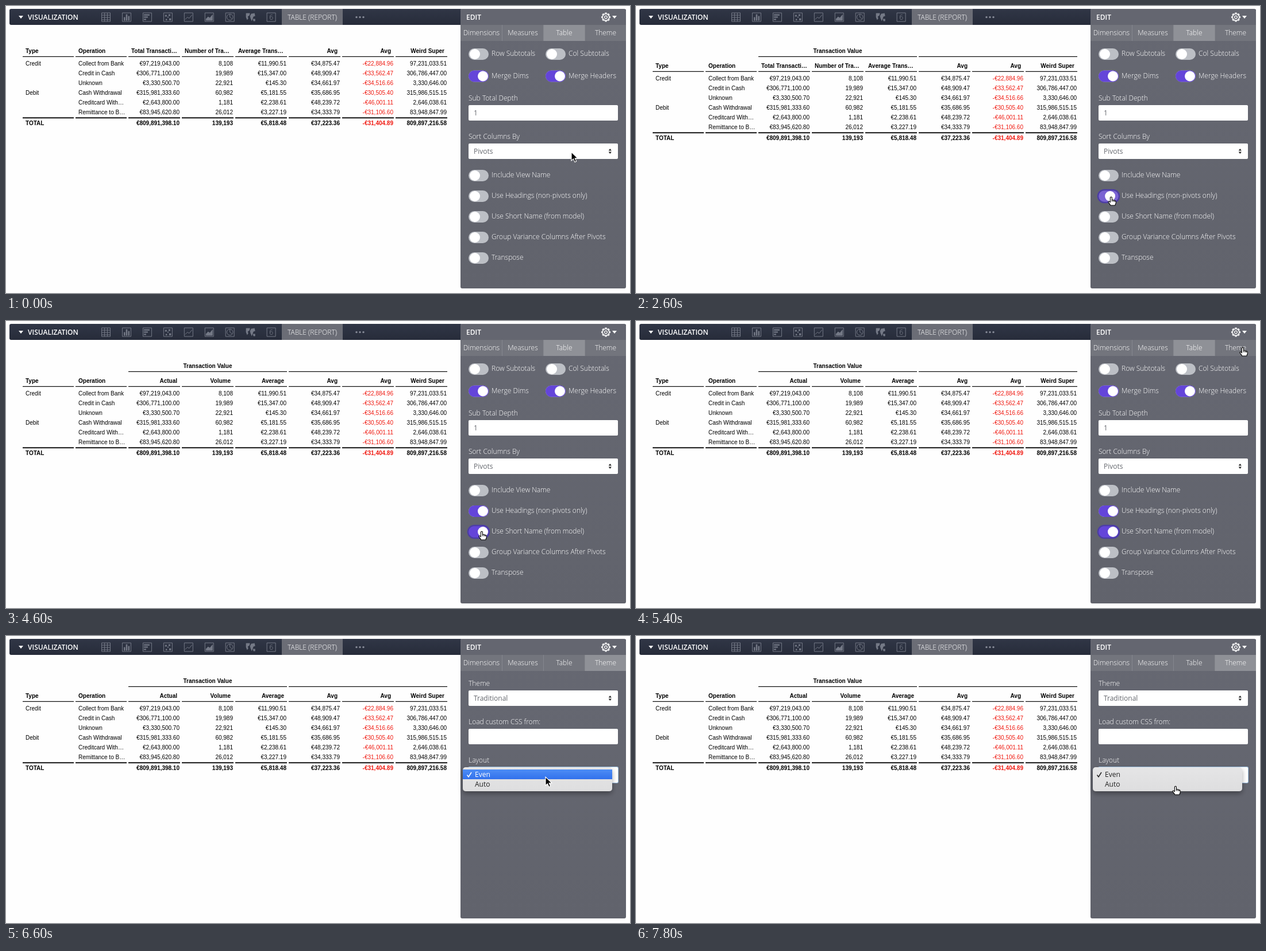
An HTML page for the animation above (8000 ms loop, 1086 by 501 pixels).

```html
<!DOCTYPE html>
<html lang="en">
<head>
<meta charset="utf-8">
<title>Table report settings</title>
<style>
  html, body { margin: 0; width: 100%; height: 100%; overflow: hidden; background: #fefefe; }
  svg { display: block; width: 1086px; height: 501px; }
  text { white-space: pre; }
  .ui { font: 300 12px "Open Sans", sans-serif; fill: #fff; }
  .strong { font-weight: 600; }
  .field { font-weight: 400; fill: #64676d; }
  .menu { font-weight: 400; fill: #222; }
  .data { font: 10px "Liberation Sans", Arial, sans-serif; fill: #000; }
  .bold { font-weight: 700; }
  .neg { fill: #f0180f; }
  .end { text-anchor: end; }
  .mid { text-anchor: middle; }
  .rule { stroke: #111; stroke-width: 1.4; }
  .icon { fill: none; stroke: #747986; stroke-width: 1; }
  .icon .solid { fill: #747986; stroke: none; }
  .ring { fill: none; stroke: #4c3da6; stroke-width: 2.5; }
</style>
</head>
<body>
<svg id="stage" viewBox="0 0 1086 501" xmlns="http://www.w3.org/2000/svg"></svg>
<script>
const LOOP = 8000, STEP = 200;

const text = (x, y, s, cls = "ui") => `<text x="${x}" y="${y}" class="${cls}">${s}</text>`;
const rect = (x, y, w, h, fill, r = 0) =>
  `<rect x="${x}" y="${y}" width="${w}" height="${h}" rx="${r}" fill="${fill}"/>`;
const group = (id, body, attrs = "") => `<g id="${id}" ${attrs}>${body}</g>`;
const path = (d, attrs = "") => `<path d="${d}" ${attrs}/>`;

// Toolbar
const frame = "M-7.5 -7.5h15v15h-15z";
const solid = 'class="solid"';
const iconBodies = [
  path(frame + "M-7.5 -3.5h15M-7.5 .5h15M-7.5 4.5h15M-2.5 -7.5v15M2.5 -7.5v15"),
  path(frame) + path("M-5 0h2.5v6h-2.5zM-1.3 -5h2.6v11h-2.6zM2.6 -2h2.5v8h-2.5z", solid),
  path(frame) + path("M-6 -5h10v2.2h-10zM-6 -1.2h7v2.2h-7zM-6 2.8h4v2.2h-4z", solid),
  path(frame) + path("M-5 -4h3v3h-3zM1 -5h3v3h-3zM-4 3h2.5v2.5h-2.5zM2 2h3.5v3.5h-3.5zM-1 -1h2v2h-2z", solid),
  path(frame + "M-6 4L-2 0L1 2L6 -4"),
  path(frame) + path("M-6 6V3L-2 -1L1 1L6 -5V6z", solid),
  path(frame + "M0 -5V0L4 3") + '<circle r="5.3"/>',
  path("M-8 -7h7l-1 4l-3 2l1 3l-2 3l-2 -5zM1 -6l6 -1l1 5l-3 1l-1 3l-2 5l-2 -5l-1 -4zM4 3h4v4h-3z", solid),
  path(frame)
];

function toolbar() {
  const icons = iconBodies
    .map((body, i) => `<g class="icon" transform="translate(${174 + i * 35.95} 19.5)">${body}</g>`).join("");
  const dots = [610, 616, 622].map(x => `<circle cx="${x}" cy="19.5" r="1.7" fill="#858996"/>`).join("");
  return rect(6, 5, 788, 28, "url(#bar)", 3) + path("M22 17h8l-4 5z", 'fill="#fff"') +
    text(38, 24, "VISUALIZATION", "ui strong") + icons +
    `<text x="461.6" y="24" class="ui mid" style="fill:#8a8e99">6</text>` +
    rect(480, 5, 106, 28, "#6b6d76") + text(533, 24, "TABLE (REPORT)", "ui mid") + dots;
}

// Data table
const colRight = i => 302 + i * 93;
const colStart = i => i < 2 ? 29 + i * 92 : 213 + (i - 2) * 93;
const colWidth = i => i < 2 ? 89 : 90;
const rows = [
  "Credit|Collect from Bank|€97,219,043.00|8,108|€11,990.51|€34,875.47|-€22,884.96|97,231,033.51",
  "|Credit in Cash|€306,771,100.00|19,989|€15,347.00|€48,909.47|-€33,562.47|306,786,447.00",
  "|Unknown|€3,330,500.70|22,921|€145.30|€34,661.97|-€34,516.66|3,330,646.00",
  "Debit|Cash Withdrawal|€315,981,333.60|60,982|€5,181.55|€35,686.95|-€30,505.40|315,986,515.15",
  "|Creditcard With…|€2,643,800.00|1,181|€2,238.61|€48,239.72|-€46,001.11|2,646,038.61",
  "|Remittance to B…|€83,945,620.80|26,012|€3,227.19|€34,333.79|-€31,106.60|83,948,847.99",
  "TOTAL||€809,891,398.10|139,193|€5,818.48|€37,223.36|-€31,404.89|809,897,216.58"
];
const line = (x, y, w, extra = "") => path(`M${x} ${y}h${w}`, `class="rule" ${extra}`);
const columnRules = (y, extra) =>
  Array.from({ length: 8 }, (_, i) => line(colStart(i), y, colWidth(i), extra)).join("");

function tableRow(row, r) {
  const total = r === 6, y = total ? 207.5 : 103.5 + r * 17, weight = total ? " bold" : "";
  return row.split("|").map((s, i) => i < 2
    ? text(34 + i * 92, y, s, "data" + weight)
    : text(colRight(i - 2), y, s, "data end" + weight + (s[0] === "-" ? " neg" : ""))).join("");
}

function table() {
  const head = (i, s) => text(colRight(i) - 4, 81.5, s, "data bold end");
  const long = ["Total Transacti…", "Number of Tra…", "Average Trans…"]
    .map((s, i) => text(218 + i * 93, 81.5, s, "data bold")).join("");
  const short = ["Actual", "Volume", "Average"].map((s, i) => head(i, s)).join("");
  const body = text(34, 81.5, "Type", "data bold") + text(126, 81.5, "Operation", "data bold") +
    group("longNames", long) + group("shortNames", short) +
    head(3, "Avg") + head(4, "Avg") + head(5, "Weird Super") +
    columnRules(88.4) + rows.map(tableRow).join("") +
    columnRules(195.2, 'style="stroke-width:2"');
  const banner = text(351, 81.5, "Transaction Value", "data bold mid") +
    line(213, 88.4, 276) + line(492, 88.4, 276);
  return group("banner", banner) + group("table", body);
}

// Settings panel
function toggle(id, x, y, label, on) {
  const body = rect(0, -10, 35, 20, "#bcbfc5", 10) +
    `<rect class="on" y="-10" width="35" height="20" rx="10" fill="#6445d9"/>` +
    `<rect class="ring" x="-1" y="-11" width="37" height="22" rx="11"/>` +
    `<circle class="knob" cx="11" r="9" fill="#fff"/>`;
  return group(id, body, `transform="translate(${x} ${y + (on ? .5 : 1)})"`) + text(x + 40, y + 4, label);
}
const input = (y, value, select) => rect(805, y, 260, 27, "#fff", 2) +
  text(814, y + 18, value, "ui field") +
  (select ? path(`M1048.7 ${y + 12.6}h5.2l-2.6 -3.6zM1048.7 ${y + 14.4}h5.2l-2.6 3.6z`, 'fill="#222"') : "");

function panel() {
  const tabs = ["Dimensions", "Measures", "Table", "Theme"];
  const gear = Array.from({ length: 8 }, (_, i) =>
    path("M-1.5 -5.6L-1.1 -7.4H1.1L1.5 -5.6", `transform="rotate(${i * 45})"`)).join("");
  return rect(791, 5, 288, 488, "url(#panel)", 3) + rect(791, 6, 288, 27, "#646670") +
    text(801, 24, "EDIT", "ui strong") +
    `<g transform="translate(1044 19.5)" fill="none" stroke="#fff" stroke-width="1.2"><circle r="5.7"/><circle r="2.4"/>${gear}</g>` +
    path("M1055 17h8l-4 5z", 'fill="#fff"') +
    rect(791, 33, 288, 28, "#73757d") + `<rect id="activeTab" y="33" width="72" height="28" fill="#8f9197"/>` +
    [863, 935, 1007].map(x => rect(x, 33, 1, 28, "#85878e")).join("") +
    tabs.map((s, i) => text(827.5 + i * 72, 51, s, "ui mid")).join("") +
    group("tableTab",
      toggle("rowSub", 805, 83, "Row Subtotals") + toggle("colSub", 939, 83, "Col Subtotals") +
      toggle("mergeDims", 805, 122, "Merge Dims", true) + toggle("mergeHeads", 939, 122, "Merge Headers", true) +
      text(805, 165, "Sub Total Depth") + input(173, "1") +
      text(805, 232, "Sort Columns By") + input(240, "Pivots", true) +
      toggle("viewName", 805, 295, "Include View Name") +
      toggle("headings", 805, 331, "Use Headings (non-pivots only)") +
      toggle("shortName", 805, 367, "Use Short Name (from model)") +
      toggle("variance", 805, 403, "Group Variance Columns After Pivots") +
      toggle("transpose", 805, 439, "Transpose")) +
    group("themeTab",
      text(805, 87, "Theme") + input(95, "Traditional", true) +
      text(805, 154, "Load custom CSS from:") + input(162, "") +
      text(805, 221, "Layout") +
      `<rect id="layoutFocus" x="804" y="228" width="262" height="29" rx="3" fill="#9fc3e6"/>` +
      input(229, "Even", true));
}

function popup() {
  return group("popup",
    `<rect x="795" y="229" width="260" height="42" rx="5" fill="url(#menu)" filter="url(#shadow)"/>` +
    `<rect id="pick" x="795" width="260" height="17" fill="url(#blue)"/>` +
    path("M802.5 242.5l2.5 3.5l5 -8", 'id="check" fill="none" stroke-width="1.5"') +
    `<text id="even" x="816" y="246" class="ui menu">Even</text>` +
    `<text id="auto" x="816" y="263" class="ui menu">Auto</text>`);
}

function pointer() {
  const arrow = path("M0 0V15L3.5 11.8L6 17.4L8.6 16.2L6.2 10.8H11z", 'fill="#000" stroke="#fff" stroke-width="1.1"');
  const hand = path("M-1.6 1.4Q0 -.8 1.4 1.4V6Q2.6 4.7 4 6.3Q5.6 5.3 6.3 7Q8.2 6.4 8.2 8.5V11Q7.5 13 6.8 15H-1.2Q-2.6 12 -5 9.6Q-5.2 7.4 -3 8.3L-1.6 9.6z" +
    "M1.4 6V8.5M4 6.5V8.8M6.3 7V9", 'fill="#fff" stroke="#000" stroke-width="1.1" stroke-linejoin="round"');
  return group("pointer", group("arrow", arrow) + group("hand", hand));
}

const gradient = (id, top, bottom) => `<linearGradient id="${id}" x2="0" y2="1">
  <stop stop-color="${top}"/><stop offset="1" stop-color="${bottom}"/></linearGradient>`;

const stage = document.getElementById("stage");
stage.innerHTML = "<defs>" + gradient("bar", "#303646", "#272c3a") + gradient("panel", "#666872", "#61636c") +
  gradient("menu", "#e5e5e6", "#dededf") + gradient("blue", "#4d8df5", "#3271ec") +
  `<filter id="shadow" x="-10%" y="-30%" width="120%" height="190%">
    <feDropShadow dx="0" dy="4" stdDeviation="4" flood-opacity=".35"/></filter></defs>` +
  rect(0, 0, 1086, 501, "#fefefe") + toolbar() + table() + panel() + popup() + pointer();

const el = id => document.getElementById(id);
const show = (id, visible) => el(id).setAttribute("visibility", visible ? "visible" : "hidden");
const between = (t, a, b) => t >= a && t < b;

function setToggle(id, amount, focused) {
  const node = el(id);
  node.querySelector(".on").style.opacity = amount < 1 ? amount * 1.15 : 1;
  node.querySelector(".knob").setAttribute("cx", 11 + 14 * amount);
  node.querySelector(".ring").style.opacity = focused ? 1 : 0;
}
["rowSub", "colSub", "viewName", "variance", "transpose"].forEach(id => setToggle(id, 0));
["mergeDims", "mergeHeads"].forEach(id => setToggle(id, 1));

// time, x, y of the pointer's hot spot
const route = [
  [0, 984, 255], [200, 984, 255], [800, 827, 368], [1200, 827, 368], [1600, 827, 331],
  [2600, 827, 333], [3200, 827, 333], [3800, 828, 367], [4600, 828, 367],
  [5400, 1056, 46], [5800, 1054, 46], [6400, 939, 246], [7000, 939, 246],
  [7400, 939, 262], [8000, 939, 262]
];
function pointerAt(t) {
  const i = route.findIndex(p => p[0] > t), a = route[i - 1], b = route[i];
  const u = (t - a[0]) / (b[0] - a[0]), ease = u * u * (3 - 2 * u);
  return [1, 2].map(k => a[k] + (b[k] - a[k]) * ease);
}
const flip = (t, start) => t < start ? 0 : t < start + STEP ? .65 : 1;

function draw(t) {
  const headed = t >= 2600, renamed = t >= 4200, theme = t >= 5800;
  show("banner", headed);
  el("table").setAttribute("transform", `translate(0 ${headed ? 26 : 0})`);
  show("longNames", !renamed);
  show("shortNames", renamed);

  setToggle("headings", flip(t, 2600), between(t, 2600, 4200));
  setToggle("shortName", flip(t, 4200), between(t, 1000, 2600) || between(t, 4200, 5800));
  el("tableTab").style.display = theme ? "none" : "";
  el("themeTab").style.display = theme ? "" : "none";
  el("activeTab").setAttribute("x", theme ? 1007 : 935);

  el("popup").style.display = t >= 6400 ? "" : "none";
  show("layoutFocus", t >= 6400);
  const picked = t < 7200 ? "even" : t < 7800 ? "auto" : "";
  el("pick").style.opacity = picked ? 1 : 0;
  el("pick").setAttribute("y", picked === "auto" ? 250 : 233);
  for (const id of ["even", "auto"]) el(id).style.fill = picked === id ? "#fff" : "#222";
  el("check").setAttribute("stroke", picked === "even" ? "#fff" : "#222");

  const hand = between(t, 1800, 4800) || between(t, 5200, 6000) || t >= 7800;
  el("arrow").style.display = hand ? "none" : "";
  el("hand").style.display = hand ? "" : "none";
  el("pointer").setAttribute("transform", `translate(${pointerAt(t).join(" ")})`);
}

function tick() {
  draw(Math.floor(performance.now() % LOOP / STEP) * STEP);
  requestAnimationFrame(tick);
}
tick();
</script>
</body>
</html>
```
